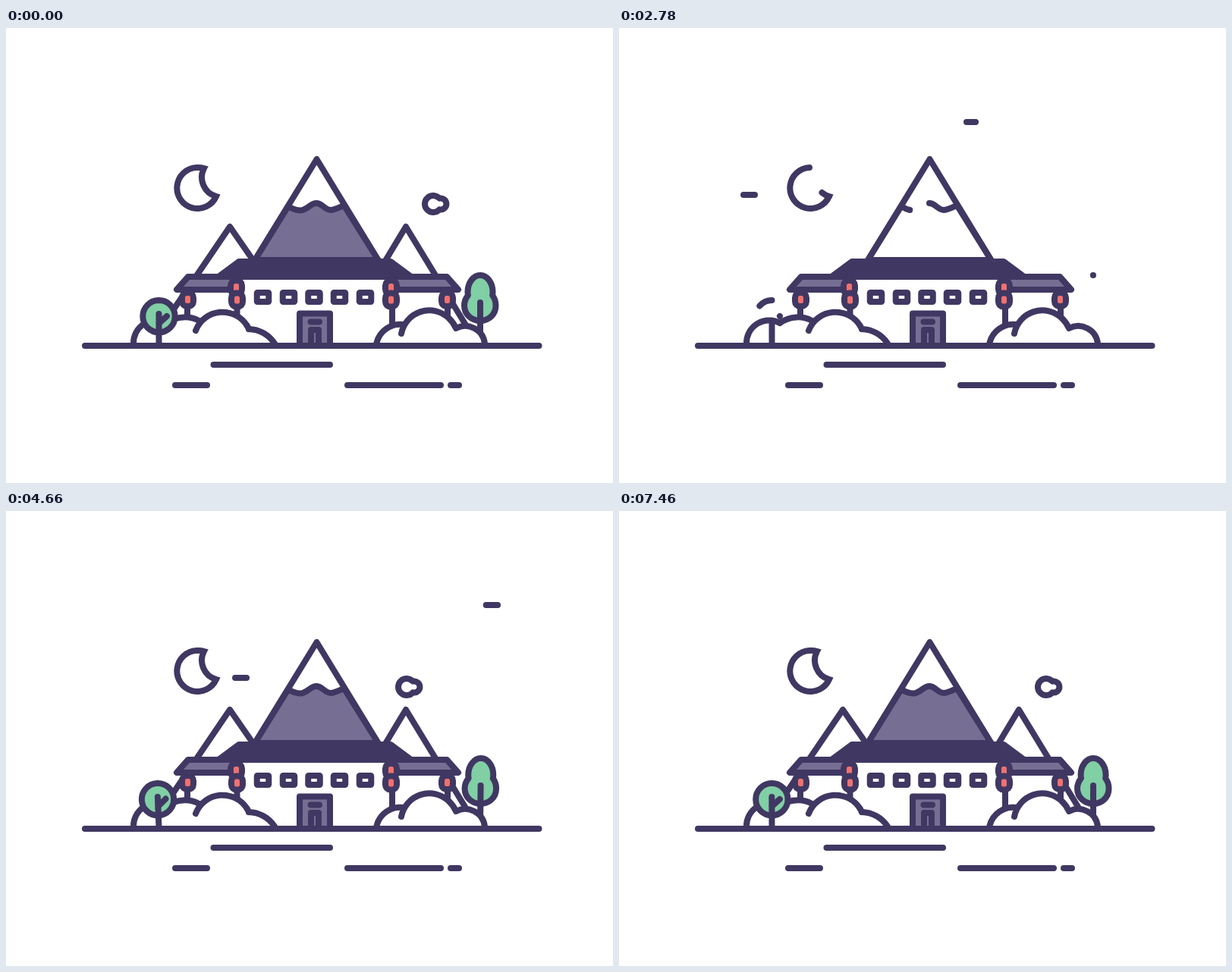
An HTML page that plays this animation: 800x600 px, repeating every 7.5 s.

```html
<!DOCTYPE html>
<html lang="en">
<head>
<meta charset="utf-8">
<title>Mountain temple</title>
<style>
  html, body { margin: 0; width: 100%; height: 100%; overflow: hidden; background: #fff; }
  svg { display: block; width: 800px; height: 600px; }
  path, line { stroke-width: 8; stroke-linecap: round; stroke-linejoin: round; }
</style>
</head>
<body>
<svg id="stage" viewBox="0 0 800 600"></svg>
<script>
const LOOP = 7500, HOLD = 500;
const DARK = '#403862', MID = '#776f93', GREEN = '#81cfa5', RED = '#f0716f', WHITE = '#fff';
const stage = document.getElementById('stage');
const shapes = [];

const clamp = (v, lo = 0, hi = 1) => Math.min(hi, Math.max(lo, v));
const ease = x => x < .5 ? 2 * x * x : 1 - 2 * (1 - x) ** 2;

function add(parent, tag, attrs) {
  const el = document.createElementNS('http://www.w3.org/2000/svg', tag);
  for (const k in attrs) el.setAttribute(k, attrs[k]);
  return parent.appendChild(el);
}
const group = () => add(stage, 'g', {});

// A line that draws itself; its fill follows the drawn part and fades in.
function draw(parent, d, start, dur, fill, fadeStart = start, fadeDur = 1, join = 'round') {
  const body = fill && add(parent, 'path', { d, fill });
  const line = add(parent, 'path', { d, fill: 'none', stroke: DARK, pathLength: 1 });
  line.style.strokeLinejoin = join;
  const shape = { d, body, line, start, dur, fadeStart, fadeDur, len: line.getTotalLength(), last: -1 };
  shapes.push(shape);
}

function box(cx, cy, w, h, r) {
  const x = cx - w / 2, y = cy - h / 2, c = `a${r} ${r} 0 0 1 `;
  return `M${x + r} ${y}h${w - 2 * r}${c}${r} ${r}v${h - 2 * r}${c}${-r} ${r}` +
    `h${2 * r - w}${c}${-r} ${-r}v${2 * r - h}${c}${r} ${-r}z`;
}

// Mountains
const hills = group();
draw(hills, 'M295 262L189 418H403z', 2800, 600, WHITE);
draw(hills, 'M527 262L622 418H433z', 2850, 600, WHITE);
draw(hills, 'M409.5 173L328 306H490.5z', 1770, 720, WHITE);
draw(hills, 'M409 231C417 231 420 240 428 240C434 240 440 236 445.5 234L490.5 306H328L372 235' +
  'C378 239 383 240.5 388 240.5C397 240.5 401 231 409 231z', 2200, 713, MID, 2880, 280);

// Right tree
const pine = group();
draw(pine, 'M625 326C616 326 608.5 336 608.5 348Q608.5 351 609 352.5C606 356 604 361 604 366' +
  'C604 378 614 386 625 386S645.5 378 645.5 366C645.5 361 644 356 641 352.5' +
  'Q641.5 351 641.5 348C641.5 336 634 326 625 326z', 2770, 550, GREEN, 3050, 300);
draw(pine, 'M625 415V362', 2900, 350);

// Temple
const temple = group();
draw(temple, 'M305 345H239V411', 1250, 450);
draw(temple, 'M512 345H582V411', 1300, 450);
const wings = add(temple, 'path', { d: 'M243 349H301V415H243zM513 349H578V415H513z', fill: WHITE });
draw(temple, 'M304.5 415V328H509V415', 950, 600, WHITE);
draw(temple, 'M240 328L225 345H303V328z', 1674, 450, MID);
draw(temple, 'M581 328L596 345H510V328z', 1830, 450, MID);
draw(temple, 'M307 308L280 328H534L507 308z', 1320, 590, DARK, 1780, 400);
[338.5, 372.5, 406, 439.5, 473.5].forEach((x, i) =>
  draw(temple, box(x, 355, 15.5, 12, .5), 1960 + i * 60, 350, WHITE));
draw(temple, 'M387 417V376.5H427V417', 1950, 500, MID, 2150, 300);
draw(temple, 'M402 417V398H412V417', 2150, 400);
draw(temple, 'M401.5 387.5H413', 2250, 250);
[[239.5, 358], [303.5, 342], [304.5, 358.5], [507.5, 342], [507.5, 358.5], [581.5, 358]].forEach(([x, y], i) =>
  draw(temple, box(x, y, 15, 18, 6.5), 2080 + i * 50, 350, RED, 2300 + i * 30, 200));

// Bushes
const bushes = group();
const leaves = add(bushes, 'path', {
  d: 'M168 417A30 30 0 0 1 212 389A40 40 0 0 1 256 387A38 38 0 0 1 320 397A42 42 0 0 1 354 417z' +
    'M488 417A32 32 0 0 1 523 391A37.5 37.5 0 0 1 593 396A26 26 0 0 1 631 417z',
  fill: WHITE
});
draw(bushes, 'M354 416A42 42 0 0 0 320 397', 1500, 300);
draw(bushes, 'M318 393A38 38 0 0 0 250 399', 1766, 300);
draw(bushes, 'M320 397L318 393', 1700, 100);
draw(bushes, 'M256 387A40 40 0 0 0 212 389', 1825, 280);
draw(bushes, 'M212 389A30 30 0 0 0 168 416', 1830, 300);
draw(bushes, 'M488.5 415A32 32 0 0 1 523 391', 1815, 300);
draw(bushes, 'M584 383A37.5 37.5 0 0 0 521 403', 1810, 320);
draw(bushes, 'M584 383A37.5 37.5 0 0 1 593 396A26 26 0 0 1 631 416', 1830, 300);

// Left tree
const tree = group();
draw(tree, 'M201.5 359A21.2 21.2 0 0 0 201.5 401.4A21.2 21.2 0 0 0 201.5 359', 2650, 500, GREEN, 2950, 300);
draw(tree, 'M201.5 415V377', 2550, 350);
draw(tree, 'M212 380L202 389', 2775, 250);

// Ground and water
const ground = group();
draw(ground, 'M104 419H702.5', 500, 650);
draw(ground, 'M273.5 444H427', 1815, 500);
draw(ground, 'M586 471H597', 1790, 350);
draw(ground, 'M450 471H573', 1880, 500);
draw(ground, 'M223 471H265', 1900, 400);

// Sky
draw(group(), 'M251 184A27 27 0 1 0 277 222A26 26 0 0 1 261 185A27 27 0 0 0 251 184', 2400, 600,
  null, 0, 1, 'miter');
const cloud = group();
draw(cloud, 'M571.2 224.7A11 11 0 1 0 571.2 239.3A7.5 7.5 0 1 0 571.2 224.7z', 2850, 550, WHITE);

const stars = [
  { x: 458, y: 124, start: 2654, end: 4830, speed: .095, reach: 190, dash: 16 },
  { x: 154, y: 220, start: 2440, end: 5360, speed: .0734, reach: 185, dash: 15 },
  { x: 552, y: 185, start: 5073, end: 7030, speed: .1056, reach: 190, dash: 15 }
];
for (const s of stars) s.el = add(stage, 'line', { y1: s.y, y2: s.y, stroke: DARK });

const show = (el, on) => { el.style.visibility = on ? 'visible' : 'hidden'; };

function partial(shape, p) {
  const n = 60, pts = [];
  for (let i = 0; i <= n; i++) {
    const q = shape.line.getPointAtLength(shape.len * p * i / n);
    pts.push(q.x.toFixed(1) + ' ' + q.y.toFixed(1));
  }
  return 'M' + pts.join('L');
}

function drawShape(s, t) {
  const p = ease(clamp((t - s.start) / s.dur));
  if (s.body) s.body.setAttribute('fill-opacity', clamp((t - s.fadeStart) / s.fadeDur));
  if (p === s.last) return;
  s.last = p;
  show(s.line, p > 0);
  s.line.setAttribute('stroke-dasharray', p < 1 ? `${p} 2` : 'none');
  if (s.body) {
    show(s.body, p > 0);
    s.body.setAttribute('d', p < 1 ? partial(s, p) : s.d);
  }
}

function render(time) {
  const t = time < HOLD ? 7477 : time;
  for (const s of shapes) drawShape(s, t);
  show(wings, t > 1750);
  leaves.setAttribute('fill-opacity', clamp((t - 1900) / 150));

  const sway = Math.cos(2 * Math.PI * (t - 5290) / 1250) * clamp((t - 3300) / 400);
  tree.setAttribute('transform', `rotate(${2.3 * sway} 201.5 417)`);
  pine.setAttribute('transform', `rotate(${-.6 * sway} 625 417)`);
  cloud.setAttribute('transform', `translate(${Math.min(0, (t - 7460) * .0125)} 0)`);

  for (const s of stars) {
    const head = (t - s.start) * s.speed;
    show(s.el, t > s.start && t < s.end);
    s.el.setAttribute('x1', s.x + clamp(head - s.dash, 0, s.reach));
    s.el.setAttribute('x2', s.x + clamp(head, 0, s.reach) + .01);
  }
}

const begin = performance.now();
function tick() {
  render((performance.now() - begin) % LOOP);
  requestAnimationFrame(tick);
}
tick();
</script>
</body>
</html>
```
